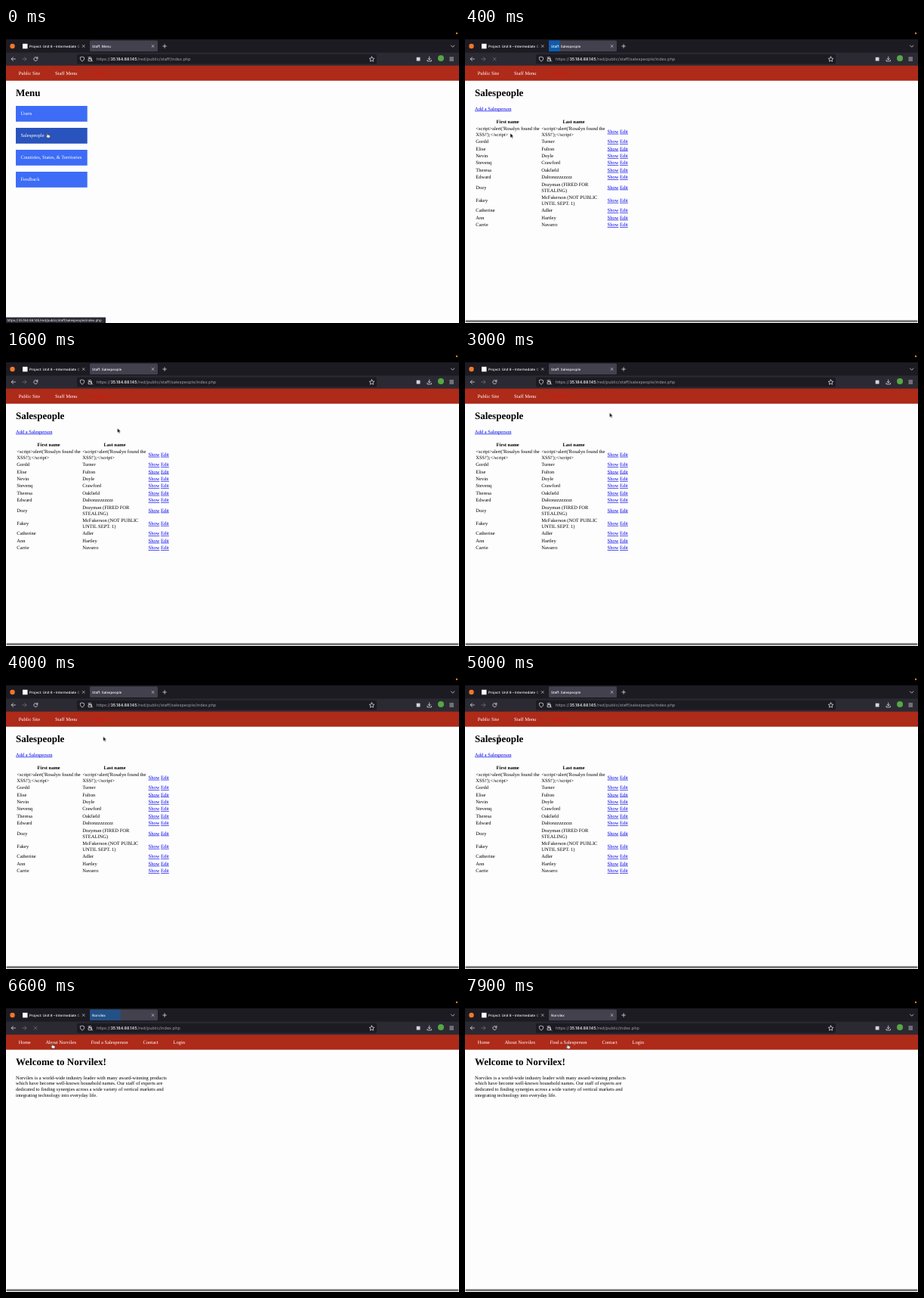
These frames come from a looping animation (600 by 390 pixels, 8000 ms). An HTML page:

```html
<!DOCTYPE html>
<html lang="en">
<head>
<meta charset="utf-8">
<title>Staff site</title>
<style>
html, body { margin: 0; width: 100%; height: 100%; overflow: hidden; background: #fdfdfd; }
svg { display: block; width: 600px; height: 390px; }
text { text-rendering: geometricPrecision; white-space: pre; }
.page text { font: 6.5px "Liberation Serif", "Times New Roman", serif; fill: #000; }
.page .h1 { font-size: 13px; font-weight: bold; }
.page .th { font-weight: bold; text-anchor: middle; }
.page .nav, .page .btn { fill: #fff; }
.page .out { fill: #e0140c; }
.page .link { fill: #0000ee; text-decoration: underline; }
.page .tab, .tab { font: 500 4.5px Inter, sans-serif; fill: #fbfbfe; }
.page .url, .url { font: 5.4px Inter, sans-serif; fill: #a6a5af; letter-spacing: .1px; }
.url.pre { letter-spacing: 0; }
.url.host { fill: #fbfbfe; font-weight: 500; letter-spacing: 0; }
.page .status { font: 4.42px Inter, sans-serif; fill: #fbfbfe; }
.icon { fill: none; stroke: #e6e6ec; stroke-width: .75; stroke-linecap: round; stroke-linejoin: round; }
.dim { stroke: #77767f; }

.anim { animation: 8s step-end infinite; }
#menu { animation-name: menu; }
#people { animation-name: people; }
#home { animation-name: home; }
#hint { animation-name: hint; }
#bar { animation-name: bar; }
#stop { animation-name: stop; }
#reload { animation-name: reload; }
#hand { animation-name: hand; }
#arrow { animation-name: arrow; }
#beam { animation-name: beam; }
#pointer { animation: move 8s linear infinite; }
#burst { animation: burst 8s linear infinite; transform-origin: 111px 24px; }

@keyframes menu { 0% { opacity: 1 } 3.75%, 100% { opacity: 0 } }
@keyframes people { 0% { opacity: 0 } 3.75% { opacity: 1 } 78.75%, 100% { opacity: 0 } }
@keyframes home { 0% { opacity: 0 } 78.75%, 100% { opacity: 1 } }
@keyframes hint { 0% { opacity: 0 } 76.25% { opacity: 1 } 78.75%, 100% { opacity: 0 } }
@keyframes bar { 0% { opacity: 0 } 3.75%, 100% { opacity: 1 } }
@keyframes stop { 0%, 11.25%, 86.25%, 100% { opacity: 0 } 2.5%, 77.5% { opacity: 1 } }
@keyframes reload { 0%, 11.25%, 86.25%, 100% { opacity: 1 } 2.5%, 77.5% { opacity: 0 } }
@keyframes hand { 0%, 75%, 93.6%, 100% { opacity: 1 } 3.125%, 89.5% { opacity: 0 } }
@keyframes arrow { 0%, 57.6%, 75%, 93.6%, 100% { opacity: 0 } 3.125%, 67%, 89.5% { opacity: 1 } }
@keyframes beam { 0%, 67%, 100% { opacity: 0 } 57.6% { opacity: 1 } }
@keyframes burst {
  0%, 3.74% { transform: scaleX(0); opacity: 0 }
  3.75% { transform: scaleX(0); opacity: .95 }
  5% { transform: scaleX(.16); opacity: .9 }
  7.5% { transform: scaleX(.45); opacity: .55 }
  11.25%, 78.74% { transform: scaleX(.95); opacity: 0 }
  78.745% { transform: scaleX(0); opacity: 0 }
  78.75% { transform: scaleX(0); opacity: .95 }
  80% { transform: scaleX(.16); opacity: .9 }
  82.5% { transform: scaleX(.45); opacity: .55 }
  86.25%, 100% { transform: scaleX(.95); opacity: 0 }
}
@keyframes move {
  0% { transform: translate(54.5px, 138.3px) }
  2.5% { transform: translate(55px, 138.3px) }
  5% { transform: translate(60px, 139px) }
  12% { transform: translate(62px, 138px) }
  20% { transform: translate(147.5px, 102px) }
  28.75%, 30% { transform: translate(186px, 84px) }
  37.5% { transform: translate(191.5px, 81.5px) }
  42.5% { transform: translate(185px, 81px) }
  52.5% { transform: translate(110px, 83px) }
  62.5%, 65% { transform: translate(45.2px, 85.6px) }
  75% { transform: translate(33px, 66px) }
  76.5%, 79% { transform: translate(31px, 60px) }
  82.5% { transform: translate(61px, 61px) }
  98.75% { transform: translate(135.5px, 61.5px) }
  100% { transform: translate(138px, 61.5px) }
}
</style>
</head>
<body>
<svg viewBox="0 0 600 390" xmlns="http://www.w3.org/2000/svg">
  <rect width="600" height="390" fill="#fdfdfd"/>
  <rect width="600" height="16" fill="#000"/>
  <circle cx="597" cy="7" r="1.2" fill="#e8821e"/>
  <rect y="15" width="600" height="18.5" fill="#1c1b22"/>
  <rect y="32.5" width="600" height="17.5" fill="#2b2a33"/>
  <rect x="111" y="16.5" width="90" height="14.5" rx="1.5" fill="#42414d"/>
  <rect id="burst" x="111" y="16.5" width="90" height="14.5" fill="#0a60b8"/>
  <rect x="94" y="34.8" width="397" height="12.6" rx="1.6" fill="#1c1b22"/>

  <circle cx="8.5" cy="24" r="3.2" fill="#f2772b"/>
  <rect x="22" y="20.8" width="6.5" height="6.5" fill="#fff"/>
  <defs>
    <linearGradient id="fade">
      <stop offset=".9" stop-color="#fbfbfe"/>
      <stop offset="1" stop-color="#fbfbfe" stop-opacity=".25"/>
    </linearGradient>
  </defs>
  <text class="tab" x="31" y="25.6" style="fill:url(#fade)">Project: Unit 8 – Intermediate C</text>

  <g class="icon">
    <path d="M101.2 22.5l3 3m0-3l-3 3M193.1 22.5l3 3m0-3l-3 3" stroke-width=".6"/>
    <path d="M207.8 24h4.6M210.1 21.7v4.6M589.5 23l2.2 2.2 2.2-2.2"/>
    <path d="M12.4 41H7.2m2.3-2.3L7.2 41l2.3 2.3"/>
    <path class="dim" d="M21.8 41h5.2m-2.3-2.3L27 41l-2.3 2.3"/>
    <path d="M101 38.1l2.7 1c0 2.5-.8 4.1-2.7 5-1.9-.9-2.7-2.5-2.7-5z"/>
    <path d="M109.5 40.7h4v3h-4zM110.3 40.7v-1.2a1.2 1.2 0 0 1 2.4 0v1.2M109 38.3l5.6 5.8"/>
    <path d="M484.5 37.9l1 2.1 2.3.3-1.7 1.6.4 2.3-2-1.1-2 1.1.4-2.3-1.7-1.6 2.3-.3z"/>
    <path d="M560.7 38v4m-1.7-1.7l1.7 1.7 1.7-1.7M558 42.4v1.5h5.4v-1.5"/>
    <path d="M587.8 39h4.8M587.8 41h4.8M587.8 43h4.8"/>
    <path id="reload" class="anim" d="M41.6 40a2.5 2.5 0 1 0 .1 1.8M41.9 38.2v2h-2"/>
    <path id="stop" class="anim dim" d="M37.2 39l4 4m0-4l-4 4"/>
  </g>
  <rect x="543.7" y="38.7" width="4.8" height="4.8" fill="#d5d5dc"/>
  <circle cx="576" cy="40" r="4" fill="#55a845"/>

  <text class="url pre" x="120" y="43">https://</text>
  <text class="url host" x="138.4" y="43">35.184.88.145</text>

  <rect y="49.7" width="600" height="20" fill="#ae2a19"/>
  <g id="menu" class="anim page"></g>
  <g id="people" class="anim page"></g>
  <g id="home" class="anim page"></g>
  <rect id="bar" class="anim" x=".5" y="386.3" width="599" height="2.7" rx="1.2" fill="#747474"/>
  <g id="hint" class="anim page"></g>

  <g id="pointer" stroke-linejoin="round">
    <path id="arrow" class="anim" d="M0 0v6.1l1.4-1.2 1 2.2 1-.4-.9-2.2h1.9z" fill="#000" stroke="#fff" stroke-width=".5"/>
    <path id="beam" class="anim" d="M-1.3-4.5Q0-4.5 0-3.5V3.5Q0 4.5-1.3 4.5M1.3-4.5Q0-4.5 0-3.5M0 3.5Q0 4.5 1.3 4.5" fill="none" stroke="#000" stroke-width=".8"/>
    <path id="hand" class="anim" d="M-.6.4q.6-.9 1.2 0v2.3l2.6.7q1 .3.8 1.4l-.5 2.2H.3l-2-2.5q-.2-.9.7-.6l.5.4z" fill="#fff" stroke="#000" stroke-width=".5"/>
  </g>
</svg>
<script>
(() => {
  const SVG = "http://www.w3.org/2000/svg";

  function add(group, tag, attrs, content = "") {
    const el = document.createElementNS(SVG, tag);
    for (const key in attrs) el.setAttribute(key, attrs[key]);
    el.textContent = content;
    document.getElementById(group).append(el);
  }
  const write = (group, cls, x, y, content) => add(group, "text", { class: cls, x, y }, content);

  function drawPage(group, title, path, heading, nav) {
    write(group, "tab", 114, 25.6, title);
    write(group, "url", 174, 43, path);
    write(group, "h1", 13, 90, heading);
    for (const [x, label] of nav) write(group, label === "Log out" ? "out" : "nav", x, 62, label);
  }

  function drawStatus(group, width, path) {
    add(group, "rect", { y: 382.5, width, height: 7.5, fill: "#2b2a33" });
    write(group, "status", 1.5, 388, "https://35.184.88.145" + path);
  }

  const staffNav = [[16.7, "Public Site"], [65, "Staff Menu"], [114, "Log out"]];
  const publicNav = [[16.7, "Home"], [52.4, "About Norvilex"], [112.5, "Find a Salesperson"],
    [181.5, "Contact"], [221.5, "Login"]];

  drawPage("menu", "Staff: Menu", "/red/public/staff/index.php", "Menu", staffNav);
  ["Users", "Salespeople", "Countries, States, & Territories", "Feedback"].forEach((label, i) => {
    const y = 103 + i * 29;
    add("menu", "rect", { x: 13, y, width: 94.7, height: 20.8, fill: i === 1 ? "#2953bd" : "#3d6cf7" });
    write("menu", "btn", 19.5, y + 12.3, label);
  });
  drawStatus("menu", 132, "/red/public/staff/salespeople/index.php");

  drawPage("people", "Staff: Salespeople", "/red/public/staff/salespeople/index.php", "Salespeople", staffNav);
  write("people", "link", 13, 108.6, "Add a Salesperson");
  write("people", "th", 56.7, 125.6, "First name");
  write("people", "th", 144, 125.6, "Last name");

  const inject = "<script>alert('Rosalyn found the|XSS!');<\/script>";
  const rows = [
    [inject, inject], ["Gordd", "Turner"], ["Elise", "Fulton"], ["Nevin", "Doyle"],
    ["Stevenq", "Crawford"], ["Theresa", "Oakfield"], ["Edward", "Daltonzzzzzzzz"],
    ["Dozy", "Dozyman (FIRED FOR|STEALING)"],
    ["Fakey", "McFakerson (NOT PUBLIC|UNTIL SEPT. 1)"],
    ["Catherine", "Adler"], ["Ann", "Hartley"], ["Carrie", "Navarro"]
  ];

  function cell(x, mid, content) {
    const lines = content.split("|");
    lines.forEach((line, i) => write("people", "", x, mid + 2.1 + (i - (lines.length - 1) / 2) * 7.9, line));
  }

  let rowTop = 128;
  for (const [first, last] of rows) {
    const height = last.includes("|") ? 17.3 : 9.42;
    const mid = rowTop + height / 2;
    cell(14.3, mid, first);
    cell(101.2, mid, last);
    write("people", "link", 188.6, mid + 2.1, "Show");
    write("people", "link", 205, mid + 2.1, "Edit");
    rowTop += height;
  }

  drawPage("home", "Norvilex", "/red/public/index.php", "Welcome to Norvilex!", publicNav);
  ["Norvilex is a world-wide industry leader with many award-winning products",
   "which have become well-known household names. Our staff of experts are",
   "dedicated to finding synergies across a wide variety of vertical markets and",
   "integrating technology into everyday life."
  ].forEach((line, i) => write("home", "", 13, 108.6 + i * 7.85, line));

  drawStatus("hint", 95, "/red/public/index.php");
})();
</script>
</body>
</html>
```
